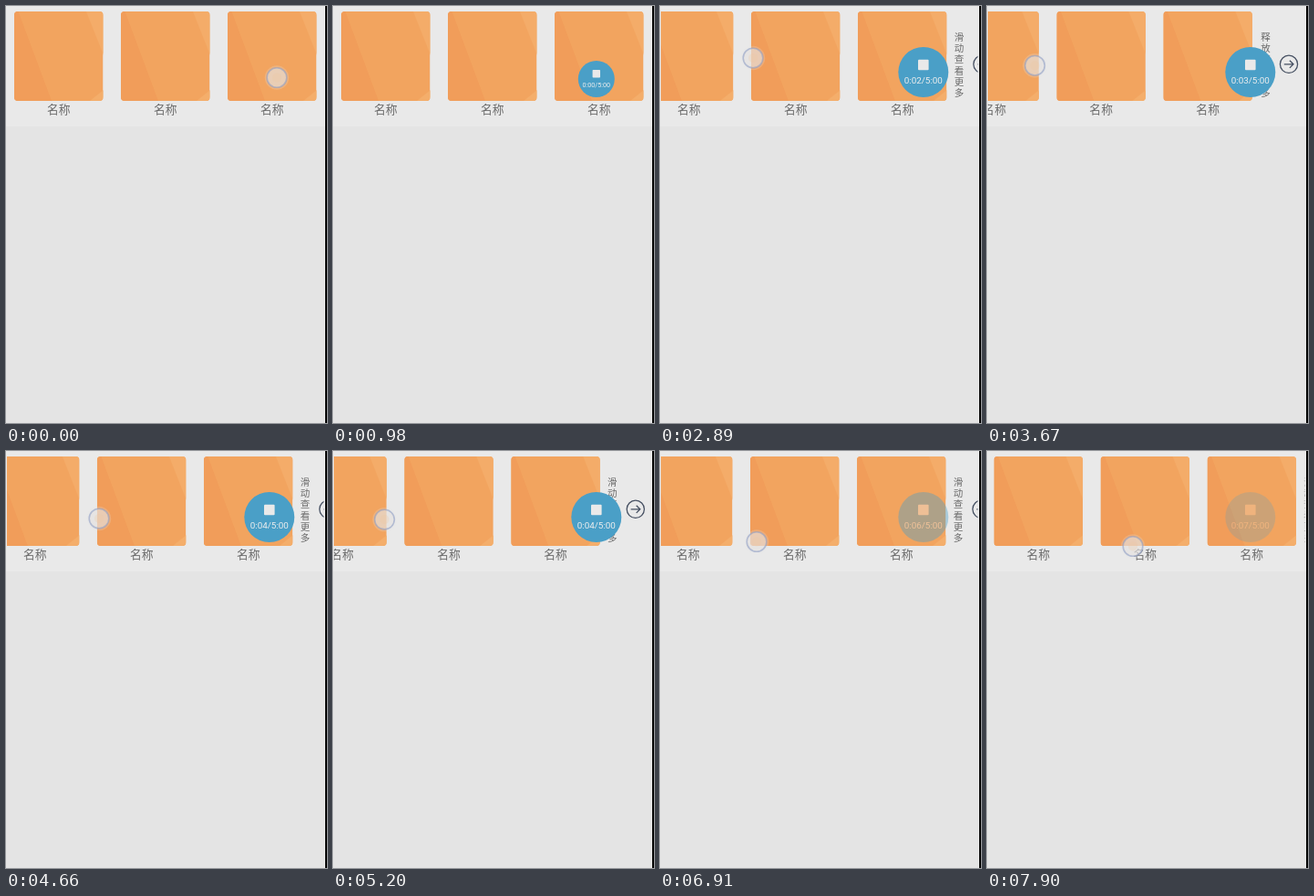
Write an HTML page that moves like this. It is 352x457 px and loops after 8000 ms.

```html
<!DOCTYPE html>
<html lang="zh">
<head>
<meta charset="utf-8">
<style>
  html, body { margin: 0; width: 100%; height: 100%; overflow: hidden; background: #000; }
  svg { display: block; width: 100vw; height: 100vh; }
  text { text-anchor: middle; fill: #6a6a6a; font-family: "Noto Sans CJK SC", "Noto Sans CJK", sans-serif; }
  #clock { fill: #eee; font: 9.9px Roboto, sans-serif; }
</style>
</head>
<body>
<svg viewBox="0 0 352 457" preserveAspectRatio="none">
  <defs>
    <clipPath id="view"><rect x="1" width="347.5" height="132"/></clipPath>
    <clipPath id="round"><rect width="97.5" height="98" rx="4"/></clipPath>
    <g id="card">
      <g clip-path="url(#round)">
        <rect width="97.5" height="98" fill="#f2a45f"/>
        <path d="M0 0H4.5L41 98H0Z" fill="#f19d5a"/>
        <path d="M79 0H98V48Z" fill="#f4ac69"/>
        <path d="M83 98L98 86V98Z" fill="#f4ae6b"/>
      </g>
      <text x="48.8" y="112" font-size="12.8">名称</text>
    </g>
  </defs>
  <rect width="350" height="457" fill="#e4e4e4"/>
  <rect width="350" height="132" fill="#e9e9e9"/>
  <g clip-path="url(#view)">
    <g id="cards">
      <use href="#card" x="9" y="6"/>
      <use href="#card" x="126" y="6"/>
      <use href="#card" x="243" y="6"/>
    </g>
    <g id="more">
      <g id="hint" font-size="10.5"></g>
      <g fill="none" stroke="#465062" stroke-width="1.3">
        <circle cx="25.5" cy="63.8" r="9.6"/>
        <path d="M20.3 63.8H30.5M26.4 59.7L30.5 63.8L26.4 67.9"/>
      </g>
    </g>
  </g>
  <g id="button">
    <circle cy="-27.5" r="27.5" fill="#4a9fc7"/>
    <rect x="-5.8" y="-41.3" width="11.6" height="11.6" rx="1" fill="#e9e9e9"/>
    <text id="clock" y="-14.6"></text>
  </g>
  <g id="finger">
    <circle r="13.2" fill="#e4e4e4" opacity=".22"/>
    <circle r="10.8" fill="#e6e2e0" fill-opacity=".58" stroke="#8f9fc4" stroke-opacity=".6" stroke-width="1.6"/>
    <circle r="5" fill="#f0c8a0" opacity=".25"/>
  </g>
</svg>
<script>
const LOOP = 8000;
const $ = id => document.getElementById(id);

// Bursts of screen updates: start, end, number of steps
const BURSTS = [
  [560, 1220, 6], [1490, 1490, 1], [2500, 3430, 8], [3550, 4510, 8],
  [4660, 5560, 8], [5710, 6610, 8], [6760, 7750, 8], [7900, 7900, 1]
];
const FINGER_X = [[560, 297], [2499, 297], [2500, 158], [2890, 102], [3430, 36], [4200, 142],
  [4660, 102], [5400, 36], [5830, 28], [6910, 106], [7900, 160]];
const FINGER_Y = [[560, 78.5], [2499, 78.5], [2500, 52], [2890, 57], [3430, 64], [4200, 72],
  [4660, 74], [5830, 76.5], [6910, 99.5], [7900, 104.5]];
const FINGER_FADE = [[560, 1], [710, 0], [2499, 0], [2500, 1]];
const GROW = [[500, 0], [950, 0.727], [1220, 1]];
const FADE = [[5490, 1], [5830, 0.82], [6910, 0.4], [7900, 0.22]];
const ANCHOR = [[5830, 157], [6500, 163]];

const chars = [...'滑动查看更多'].map((c, i) => {
  const el = document.createElementNS('http://www.w3.org/2000/svg', 'text');
  el.setAttribute('y', 37.8 + i * 12.3);
  el.textContent = c;
  $('hint').append(el);
  return el;
});

function at(keys, t) {
  const i = keys.findIndex(k => k[0] > t);
  if (i === 0) return keys[0][1];
  if (i < 0) return keys[keys.length - 1][1];
  const [t0, a] = keys[i - 1], [t1, b] = keys[i];
  return a + (b - a) * (t - t0) / (t1 - t0);
}

// Latest screen update at or before t, on a 30 ms grid
function snap(t) {
  let last = 0;
  for (const [start, end, steps] of BURSTS) {
    for (let i = 0; i < steps; i++) {
      const step = start + Math.round((end - start) * i / Math.max(1, steps - 1) / 30) * 30;
      if (step <= t) last = step;
    }
  }
  return last;
}

function move(el, x, y, scale = 1) {
  el.setAttribute('transform', `translate(${x} ${y}) scale(${scale})`);
}

function draw(time) {
  const t = snap(time);
  const x = at(FINGER_X, t);
  const scroll = t < 2500 ? 0 : Math.min(0, 0.475 * (x - at(ANCHOR, t)));

  move($('cards'), scroll, 0);
  move($('more'), Math.max(305.5, 354 + scroll), 0);
  [...(scroll < -48 ? '释放' : '滑动')].forEach((c, i) => { chars[i].textContent = c; });

  move($('button'), 288.8, 100, at(GROW, t));
  $('button').setAttribute('opacity', at(FADE, t));
  $('clock').textContent = `0:0${Math.max(0, Math.floor((t - 490) / 1000))}/5:00`;

  move($('finger'), x, at(FINGER_Y, t));
  $('finger').setAttribute('opacity', at(FINGER_FADE, t));
}

const begin = performance.now();
function tick() {
  draw((performance.now() - begin) % LOOP);
  requestAnimationFrame(tick);
}
tick();
</script>
</body>
</html>
```
